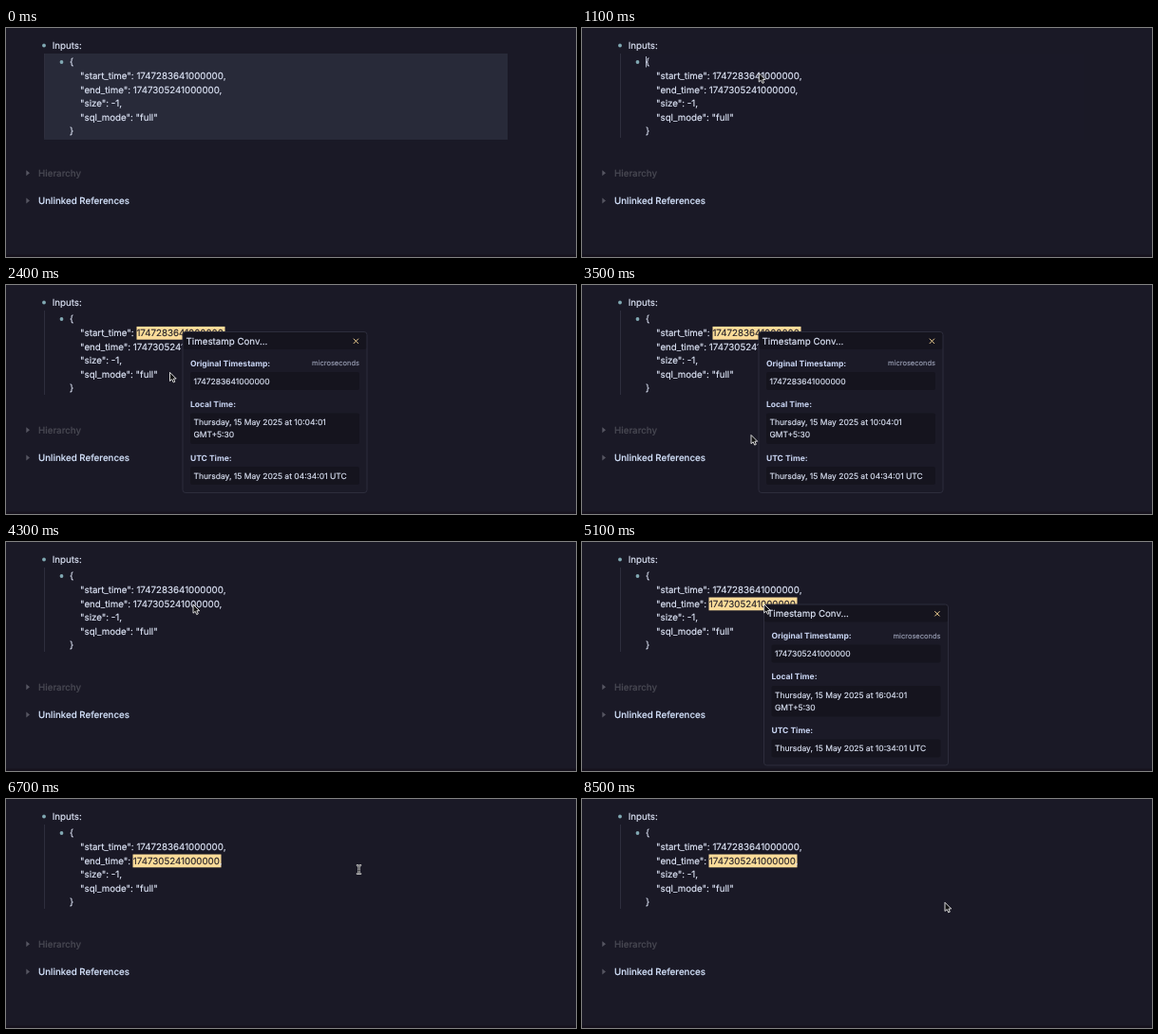
Recreate the animation shown at these times as an HTML page. Size 600 px wide and 242 px high, loop 8600 ms.

```html
<!DOCTYPE html>
<html lang="en">
<head>
<meta charset="utf-8">
<title>Timestamp converter</title>
<style>
  html, body { margin: 0; width: 100%; height: 100%; overflow: hidden; background: #1a1926; }
  svg { display: block; width: 600px; height: 242px; }
  text {
    font: 9.73px Inter, sans-serif; white-space: pre; text-rendering: geometricPrecision;
    color: #dfe6f8; fill: currentColor; stroke: currentColor; stroke-width: .15px;
  }
  tspan { fill: currentColor; stroke: currentColor; }
  .heading { font-weight: 500; color: #d3e1fa; }
  .dim { color: #494953; }
  .small { font-size: 8.51px; }
  .label { font-size: 8.51px; font-weight: 700; color: #cbd7f5; stroke: none; }
  .unit { font-size: 7.5px; color: #969bb0; }
  .selected { color: #28242a; }
  .field, .header { fill: #15141e; }
</style>
</head>
<body>
<svg id="stage" viewBox="0 0 600 242">
  <rect width="600" height="242" fill="#1a1926"/>
  <rect y="239.5" width="600" height="2.5" fill="#16121d"/>
  <rect id="blockGlow" x="40" y="27" width="488" height="91" fill="#282a39"/>
  <path d="M40.5 27V116" stroke="#2e2e3d"/>
  <g fill="#80a8b2"><circle cx="40" cy="18.5" r="1.9"/><circle cx="58.5" cy="36" r="1.9"/></g>
  <text x="48.7" y="22.2">Inputs:</text>
  <g id="code"></g>
  <path id="caret" d="M67.5 30V41.5" stroke="#dbe2f5" stroke-width=".8"/>
  <g fill="#565662"><path d="M21.3 150.2L25 153.2L21.3 156.2Z"/><path d="M21.3 179.4L25 182.4L21.3 185.4Z"/></g>
  <text class="heading dim" x="34" y="157">Hierarchy</text>
  <text class="heading" x="34" y="186.2">Unlinked References</text>
  <g id="popups"></g>
  <g id="cursor">
    <path id="arrow" d="M0 0V9.2L2.2 7.3L3.7 10.6L5.3 9.9L3.9 6.7H6.7Z" fill="#111" stroke="#eee" stroke-width=".9" stroke-linejoin="round"/>
    <g id="beam" fill="none">
      <path d="M-2.6-4.5Q0-4.5 0-3Q0-4.5 2.6-4.5M0-3V3M-2.6 4.5Q0 4.5 0 3Q0 4.5 2.6 4.5M-1.2 1H1.2" stroke="#eee" stroke-width="2"/>
      <path d="M-2.6-4.5Q0-4.5 0-3Q0-4.5 2.6-4.5M0-3V3M-2.6 4.5Q0 4.5 0 3Q0 4.5 2.6 4.5M-1.2 1H1.2" stroke="#222" stroke-width=".7"/>
    </g>
  </g>
</svg>
<script>
const LOOP = 8600, STEP = 100, LINE = 14.6, FIRST_BASELINE = 39.4;
const $ = id => document.getElementById(id);
const show = (node, on) => node.setAttribute('visibility', on ? 'visible' : 'hidden');

const stamps = [
  { key: 'start_time', value: '1747283641000000', selX: 137.5,
    x: 186, y: 49.5, select: [1300, 3700], popup: [1400, 3700],
    local: '10:04:01', utc: '04:34:01' },
  { key: 'end_time', value: '1747305241000000', selX: 133.5,
    x: 191.5, y: 66, select: [5000, LOOP], popup: [5000, 6500],
    local: '16:04:01', utc: '10:34:01' }
];

const codeLine = (row, x, body) =>
  `<text x="${x}" y="${FIRST_BASELINE + row * LINE}">${body}</text>`;

$('code').innerHTML =
  stamps.map((s, i) =>
    `<rect id="mark${i}" x="${s.selX}" y="${43.9 + i * LINE}" width="93" height="13.8" fill="#fbdc99"/>`).join('') +
  codeLine(0, 67, '{') +
  stamps.map((s, i) =>
    codeLine(i + 1, 78, `"${s.key}": <tspan id="value${i}">${s.value}</tspan>,`)).join('') +
  codeLine(3, 78, '"size": -1,') +
  codeLine(4, 78, '"sql_mode": "full"') +
  codeLine(5, 67, '}');

const field = (y, height, ...lines) =>
  `<rect class="field" x="8" y="${y}" width="178" height="${height}" rx="2"/>` +
  lines.map((line, i) =>
    `<text class="small" x="11.5" y="${y + 12.8 + i * 13}">${line}</text>`).join('');
const label = (y, body) => `<text class="label" x="8" y="${y}">${body}</text>`;

$('popups').innerHTML = stamps.map((s, i) => `
  <g id="popup${i}" transform="translate(${s.x} ${s.y})">
    <rect width="194" height="170" rx="3" fill="#1b1a27"/>
    <rect class="header" width="194" height="18.5" rx="3"/>
    <rect width="194" height="170" rx="3" fill="none" stroke="#2d2d3c"/>
    <text x="3.6" y="13.2">Timestamp Conv...</text>
    <path d="M179.8 7.2l5.2 5.2m0-5.2l-5.2 5.2" stroke="#efcf91"/>
    ${label(36, 'Original Timestamp:')}
    <text class="unit" x="186" y="35.6" text-anchor="end">microseconds</text>
    ${field(42.5, 19, s.value)}
    ${label(79.2, 'Local Time:')}
    ${field(86, 32.5, 'Thursday, 15 May 2025 at ' + s.local, 'GMT+5:30')}
    ${label(136, 'UTC Time:')}
    ${field(142.5, 19, `Thursday, 15 May 2025 at ${s.utc} UTC`)}
  </g>`).join('');

// Pointer stops: time, x, y
const path = [
  [200, 230, 173], [1000, 186.3, 47.8], [1600, 186.3, 47.8], [2000, 210, 150],
  [2400, 172.5, 92.3], [2600, 172.5, 92.3], [3400, 178, 158.5], [3600, 178, 158.5],
  [3900, 178, 130], [4000, 178, 130], [4300, 197, 66], [4400, 197, 66],
  [4800, 191.7, 65.7], [5200, 191.7, 65.7], [5600, 225, 120], [5900, 260, 125],
  [6400, 371.5, 74.5], [7000, 371.5, 74.5], [7700, 382, 109.3], [LOOP, 382, 109.3]
];

function pointerAt(t) {
  const next = Math.max(1, path.findIndex(p => p[0] > t));
  const [t0, x0, y0] = path[next - 1], [t1, x1, y1] = path[next];
  const u = Math.min(1, Math.max(0, (t - t0) / (t1 - t0)));
  const k = u * u * (3 - 2 * u);
  return [x0 + (x1 - x0) * k, y0 + (y1 - y0) * k];
}

const within = (t, [from, to]) => t >= from && t < to;

function render(t) {
  $('blockGlow').setAttribute('opacity', t < 200 ? 1 : Math.exp((150 - t) / 350));
  show($('caret'), within(t, [900, 1200]));
  stamps.forEach((s, i) => {
    const selected = within(t, s.select);
    show($('mark' + i), selected);
    $('value' + i).setAttribute('class', selected ? 'selected' : '');
    show($('popup' + i), within(t, s.popup));
  });
  const beam = within(t, [6500, 7200]);
  $('cursor').setAttribute('transform', `translate(${pointerAt(t)})`);
  show($('arrow'), t >= 200 && !beam);
  show($('beam'), beam);
}

const start = performance.now();
function tick() {
  const t = (performance.now() - start) % LOOP;
  render(Math.floor(t / STEP) * STEP);
  requestAnimationFrame(tick);
}
tick();
</script>
</body>
</html>
```
